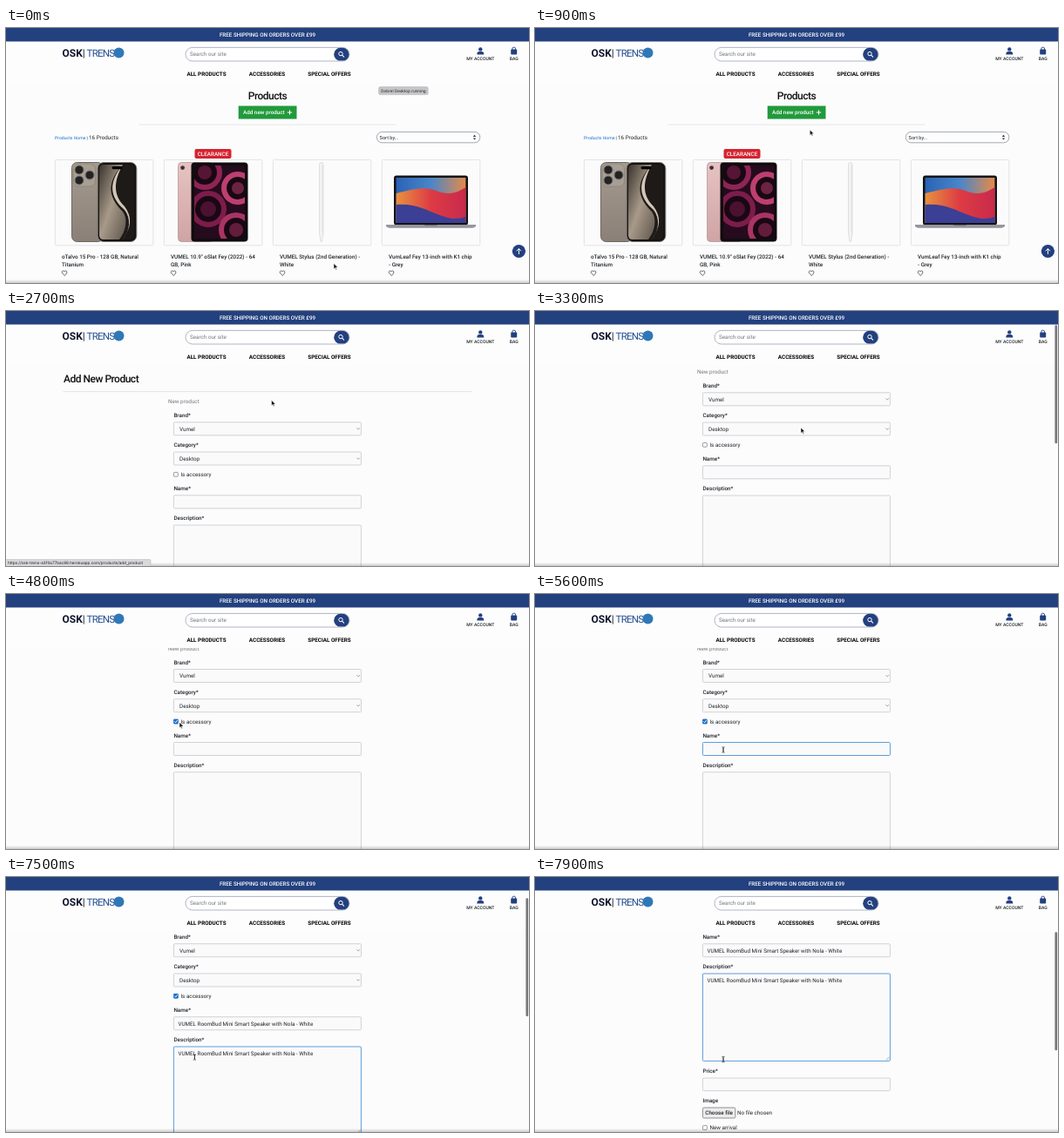
Animation of 600x293 px, one loop 8000 ms. Source, as an HTML page:

```html
<!DOCTYPE html>
<html lang="en">
<head>
<meta charset="utf-8">
<title>Shop admin: add product</title>
<style>
  html, body { margin: 0; width: 100%; height: 100%; overflow: hidden; background: #fcfcfd; }
  svg { display: block; width: 100%; height: 100%; }
  text { font: 400 6.3px Roboto, sans-serif; fill: #212529; text-rendering: geometricPrecision; white-space: pre; }
  .mid { text-anchor: middle; }
  .med { font-weight: 500; }
  .bold { font-weight: 700; fill: #000; }
  .white { fill: #fff; }
  .grey { fill: #75787f; }
  .small { font-size: 5.1px; }
  .sort { font-size: 5.6px; }
  .link { font-size: 5.1px; fill: #1a6fc4; }
  .head { font-size: 12px; font-weight: 500; letter-spacing: -.5px; fill: #111; }
  .logo { font-size: 12px; fill: #10162c; }
  .logo2 { font-size: 11.6px; letter-spacing: -.8px; fill: #24508f; }
  .sys { font: 400 4.6px Inter, sans-serif; fill: #1c1c1e; }
  .field { fill: #fafafb; stroke: #c6c8cc; stroke-width: .8; }
  .focus { stroke: #4b93d6; stroke-width: .9; }
  .line { fill: none; stroke-linecap: round; stroke-linejoin: round; }
</style>
</head>
<body>
<svg id="stage" viewBox="0 0 600 293" preserveAspectRatio="none"></svg>
<script>
const NAVY = '#23407f';
const ITEM = 'VUMEL RoomBud Mini Smart Speaker with Nola - White';
const LOOP = 8000;

const text = (x, y, s, cls = '', id = '') => `<text x="${x}" y="${y}" class="${cls}" id="${id}">${s}</text>`;
const rect = (x, y, w, h, attrs = '') => `<rect x="${x}" y="${y}" width="${w}" height="${h}" ${attrs}/>`;
const circle = (x, y, r, attrs = '') => `<circle cx="${x}" cy="${y}" r="${r}" ${attrs}/>`;
const path = (d, color, width = .8) => `<path d="${d}" class="line" stroke="${color}" stroke-width="${width}"/>`;
const shape = (d, fill) => `<path d="${d}" fill="${fill}"/>`;
const group = (id, body) => `<g id="${id}">${body}</g>`;
const gradient = (id, dir, ...colors) => `<linearGradient id="${id}" x1="0" y1="0" ${dir}>` +
  colors.map((c, i) => `<stop offset="${i / (colors.length - 1)}" stop-color="${c}"/>`).join('') + '</linearGradient>';

const header = () =>
  rect(0, 0, 600, 62, 'fill="#fdfdfd"') +
  rect(0, 0, 600, 15.5, `fill="${NAVY}"`) +
  text(300, 10, 'FREE SHIPPING ON ORDERS OVER £99', 'mid med white') +
  text(64.5, 33.4, '<tspan font-weight="700">OSK</tspan>|', 'logo') +
  text(92.6, 33.4, 'TRENS', 'logo2') +
  circle(129.5, 28.6, 6, 'fill="#2f78b7"') +
  rect(206, 22.4, 188, 15.6, 'rx="7.8" fill="#fff" stroke="#9fa4b6" stroke-width=".8"') +
  text(211, 32.3, 'Search our site', 'grey') +
  rect(376.2, 22.8, 17.4, 14.8, `rx="7.4" fill="${NAVY}"`) +
  circle(384, 29.6, 2.2, 'fill="none" stroke="#fff"') + path('M385.8 31.4l1.8 1.8', '#fff', 1.1) +
  circle(544.3, 24.4, 2.2, `fill="${NAVY}"`) +
  shape('M540.4 30.6v-1q0-2.6 2.6-2.6h2.6q2.6 0 2.6 2.6v1z', NAVY) +
  text(544.3, 36.8, 'MY ACCOUNT', 'mid med small') +
  rect(579.2, 24.6, 7, 6, `rx="1" fill="${NAVY}"`) + path('M580.8 26v-2a1.9 1.9 0 0 1 3.8 0v2', NAVY, .9) +
  text(582.7, 36.8, 'BAG', 'mid med small') +
  [[230, 'ALL PRODUCTS'], [299.5, 'ACCESSORIES'], [371, 'SPECIAL OFFERS']]
    .map(([x, s]) => text(x, 55.3, s, 'mid bold')).join('');

const phone = () =>
  gradient('titan', 'x2="0" y2="1"', '#a59b90', '#8a8077') +
  gradient('glow', 'x2="1" y2="1"', '#3a332e', '#a89a89', '#5e544b') +
  rect(75.5, 154.5, 36, 91, 'rx="6" fill="url(#titan)" stroke="#6f675f"') +
  rect(77.5, 156, 25, 26, 'rx="6" fill="#a89f94" stroke="#857c72" stroke-width=".6"') +
  [[84, 163], [84, 175], [96, 169]].map(([x, y]) =>
    circle(x, y, 5, 'fill="#232225" stroke="#7b736a"')).join('') +
  rect(105.2, 154.5, 44.6, 91, 'rx="7" fill="#131212" stroke="#7f776e"') +
  rect(107.5, 157, 40, 86, 'rx="5" fill="#1d1a18"') +
  shape('M112 157h22c-20 22-16 38 0 54 6 8 4 22-4 32h-18q-5 0-5-5v-76q0-5 5-5z', 'url(#glow)') +
  shape('M134 157c-18 22-14 38 2 52 8 10 6 24-2 34 10-14 11-26 2-38-14-14-12-30-2-48z', '#d3c6b4') +
  rect(121.5, 159, 12, 3.2, 'rx="1.6" fill="#000"');

const tablet = () =>
  gradient('rose', 'x2="0" y2="1"', '#e6c3c2', '#cfa4a4') +
  rect(197.5, 154.5, 40, 91, 'rx="4" fill="url(#rose)" stroke="#b48f90" stroke-width=".7"') +
  circle(202.6, 160.6, 2.4, 'fill="#3a3234"') +
  rect(212.5, 154.5, 65, 91, 'rx="4" fill="#0f0c0e"') +
  '<clipPath id="screen"><rect x="216" y="158" width="58" height="84"/></clipPath>' +
  `<g clip-path="url(#screen)">${rect(216, 158, 58, 84, 'fill="#260a1d"')}` +
  [[228, 166, 17, '#8f2455'], [266, 184, 16, '#bd3f70'], [232, 208, 18, '#7c1c4b'], [264, 232, 17, '#a93463']]
    .map(([x, y, r, c]) => circle(x, y, r, `fill="#1a0714" stroke="${c}" stroke-width="6"`) +
      circle(x, y, r - 9, `fill="${c}" opacity=".5"`)).join('') + '</g>';

const pen = () =>
  '<path d="M359.6 157q0-2.5 2.2-2.5t2.2 2.5v79l-1.6 9.5h-1.2l-1.6-9.5z" fill="#f5f5f6" stroke="#cbcbce" stroke-width=".6"/>' +
  path('M363 158v77', '#dadadd');

const laptop = () =>
  gradient('sky', 'x2="1" y2="0"', '#2a63b5', '#4a86c8', '#e58a4a') +
  gradient('dune', 'x2="1" y2="0"', '#e8923f', '#dd3b44', '#c82a4c') +
  rect(445, 169.6, 85, 57, 'rx="3" fill="#141416"') +
  rect(447.6, 172, 79.8, 52, 'fill="url(#sky)"') +
  shape('M447.6 190c22-6 34-8 46-3s22 4 33.800-4v41h-79.800z', 'url(#dune)') +
  shape('M447.6 203c22-2 34 6 50 12s22 4 29.8 2v7h-79.8z', '#3b3f95') +
  shape('M436 226h103v1.200q-1 2.600-6 2.600h-91q-5 0-6-2.600z', '#96979b') +
  rect(480, 226, 15, 1.2, 'rx=".6" fill="#6f7074"');

const products = [
  ['oTalvo 15 Pro - 128 GB, Natural', 'Titanium', phone],
  ['VUMEL 10.9" oSlat Fey (2022) - 64', 'GB, Pink', tablet],
  ['VUMEL Stylus (2nd Generation) -', 'White', pen],
  ['VumLeaf Fey 13-inch with K1 chip', '- Grey', laptop],
];

const card = ([a, b, art], i) => {
  const x = 56.4 + i * 125;
  return rect(x, 151.4, 112.4, 98.4, 'rx="1" fill="#fbfbfc" stroke="#dcdde0" stroke-width=".8"') + art() +
    text(x + 7.6, 265, a, 'med') + text(x + 7.6, 274.4, b, 'med') +
    path(`M${x + 10.7} 284.3l-2.5-2.5c-1.5-2.3 1.5-4 2.5-1.9c1-2.1 4-.4 2.5 1.9z`, '#333', .7);
};

const listPage = () =>
  text(300, 82.4, 'Products', 'head mid') +
  rect(266.7, 89.5, 66.8, 15, 'id="add"') +
  text(272, 99.3, 'Add new product', 'white med') + path('M323.2 97h4.6M325.5 94.7v4.6', '#fff', 1) +
  path('M153 111h294', '#dedfe2') +
  text(56, 127.8, 'Products Home', 'link') + text(92.4, 127.8, '|', 'small') + text(95, 127.8, '16 Products') +
  rect(425.4, 119.4, 118.4, 12.4, 'rx="6" fill="#fdfdfd" stroke="#8f939c" stroke-width=".8"') +
  text(428.6, 127.5, 'Sort by...', 'sort') +
  shape('M535.8 125l1.7-2.2 1.7 2.2zM535.8 126.4l1.7 2.2 1.7-2.2z', '#333') +
  products.map(card).join('') +
  rect(216.5, 139, 42, 11, 'rx="2" fill="#d6232f"') + text(237.5, 146.8, 'CLEARANCE', 'mid med white') +
  circle(588.4, 256.5, 7.6, `fill="${NAVY}"`) + path('M588.4 259.5v-5.6M586 256l2.4-2.4 2.4 2.4', '#fff', 1);

const label = (y, s) => text(192.4, y, s, 'med');
const field = (y, h = 15, id = '') => rect(192.4, y, 215, h, `rx="1" class="field" id="${id}"`);
const select = (y, s) => field(y) + text(199, y + 10, s) + path(`M402.8 ${y + 6.9}l1.4 1.4 1.4-1.4`, '#777', .7);
const box = y => rect(192.5, y, 4.8, 4.8, 'rx=".8" fill="#fff" stroke="#6f7278" stroke-width=".7"');

const formPage = () =>
  text(66, 82.4, 'Add New Product', 'head') + path('M66 92.6h468', '#dedfe2') +
  text(186, 106.4, 'New product', 'grey') +
  label(122.2, 'Brand*') + select(127.8, 'Vumel') +
  label(156.3, 'Category*') + select(162, 'Desktop') +
  box(185.4) +
  group('check', rect(192.2, 185.1, 5.4, 5.4, 'rx=".9" fill="#1a70d2"') + path('M193.5 187.9l1.1 1.2 1.9-2.5', '#fff', .9)) +
  text(200.4, 190.1, 'Is accessory') +
  label(206.2, 'Name*') + field(211.8, 15, 'name') + text(197.4, 221.7, ITEM, '', 'nameText') +
  label(240.2, 'Description*') + field(246, 100.4, 'desc') + path('M404.5 345l1.5-1.5M402.8 345l3.2-3.2', '#888', .5) +
  text(197.4, 255.7, ITEM, '', 'descText') +
  label(360, 'Price*') + field(366, 14.6) +
  label(394.2, 'Image') +
  rect(192.4, 400, 37.4, 12, 'rx="1.5" fill="#ededee" stroke="#777" stroke-width=".8"') +
  text(211.1, 408.1, 'Choose file', 'mid med') + text(232, 408.1, 'No file chosen') +
  box(420.6) + text(200.4, 425.1, 'New arrival');

const cursors = () =>
  group('arrow', '<path d="M0 0v6.4l1.5-1.4 1 2.3 1-.4-1-2.3h2.1z" fill="#111" stroke="#fff" stroke-width=".5"/>') +
  group('hand', '<path d="M0 .6q.8-1 1.5 0v2.6l2.6.6q.7.3.5 1l-.6 2.4h-3.3l-2-2.5q0-1 1.3-.3z" fill="#fff" stroke="#111" stroke-width=".6"/>') +
  group('beam', path('M-1.2-3.2q1.2 0 1.2.7v5q0 .7-1.2.7M1.2-3.2q-1.2 0-1.2.7v5q0 .7 1.2.7', '#222', .7));

const stage = document.getElementById('stage');
stage.innerHTML =
  gradient('edge', 'x2="0" y2="1"', '#0000', '#0003') +
  rect(0, 0, 600, 293, 'fill="#fcfcfd"') +
  group('list', listPage()) + group('form', formPage()) + header() +
  group('tip', rect(427.6, 67.6, 56.6, 9, 'rx="1.5" fill="#c6c6c8" stroke="#b0b0b2" stroke-width=".5"') +
    text(456, 73.7, 'Dobrel Desktop running', 'sys mid')) +
  rect(596.4, 0, 2.8, 136, 'id="bar" rx="1.4" fill="#77787b"') +
  rect(0, 289, 600, 4, 'fill="url(#edge)"') +
  group('url', rect(-1, 285.6, 167, 8.4, 'rx="1" fill="#d9d9dc" stroke="#bdbdc1" stroke-width=".6"') +
    text(2, 291.2, 'https://osk-trens-a3f0a77bac88.herokuapp.com/products/add_product', 'sys')) +
  group('cursor', cursors());

const $ = id => document.getElementById(id);
const show = (id, on) => $(id).setAttribute('visibility', on ? 'visible' : 'hidden');

// Steps are [time, ...values]; values ease between neighbours.
const moves = [
  [0, 376, 270.5], [100, 375, 268], [600, 318, 122], [800, 316, 118], [1500, 303.4, 98.8],
  [2300, 303.4, 98.8], [2400, 304.6, 102.4], [2700, 304.6, 102.4], [3300, 305, 134],
  [3800, 305, 134], [4600, 199, 147.4], [4800, 199, 147.4], [5300, 216, 179],
  [6000, 216, 179], [6500, 216.4, 207], [7500, 216.4, 207], [7900, 216, 209.6],
];
const scrolls = [[2700, 0], [3300, 34], [3400, 41.3], [7400, 41.3], [7900, 135]];

const smooth = k => k * k * (3 - 2 * k);
function at(steps, t) {
  let i = steps.findIndex(s => s[0] > t);
  if (i < 0) i = steps.length;
  if (i === 0 || i === steps.length) return steps[Math.max(0, i - 1)].slice(1);
  const [a, b] = [steps[i - 1], steps[i]];
  const k = smooth((t - a[0]) / (b[0] - a[0]));
  return a.slice(1).map((v, n) => v + (b[n + 1] - v) * k);
}

function draw(t) {
  const onForm = t >= 2300;
  const [scroll] = at(scrolls, t);
  const [x, y] = at(moves, t);
  const hover = t >= 1100 && !onForm;
  const beam = t >= 5100;

  show('list', !onForm);
  show('form', onForm);
  show('tip', t < 300);
  show('url', t >= 2000 && t < 3000);
  $('add').setAttribute('fill', hover ? '#12682a' : '#219a3c');
  $('form').setAttribute('transform', `translate(0 ${-scroll})`);

  const set = (id, on) => show(id, onForm && on);
  set('check', t >= 4800);
  set('nameText', t >= 5900);
  set('descText', t >= 7100);
  $('name').setAttribute('class', t >= 5300 && t < 6700 ? 'field focus' : 'field');
  $('desc').setAttribute('class', t >= 6700 ? 'field focus' : 'field');

  $('bar').setAttribute('y', .5 + scroll * .465);
  $('bar').setAttribute('opacity', t >= 7500 ? 1 : t < 2800 ? 0 : Math.max(0, Math.min(1, (4200 - t) / 300)));

  $('cursor').setAttribute('transform', `translate(${x} ${y})`);
  show('hand', hover);
  show('beam', beam);
  show('arrow', !hover && !beam);
}

const start = performance.now();
function tick(now) {
  const t = Math.max(0, now - start) % LOOP;
  draw(Math.floor((t + 1) / 100) * 100 % LOOP);
  requestAnimationFrame(tick);
}
draw(0);
requestAnimationFrame(tick);
</script>
</body>
</html>
```
